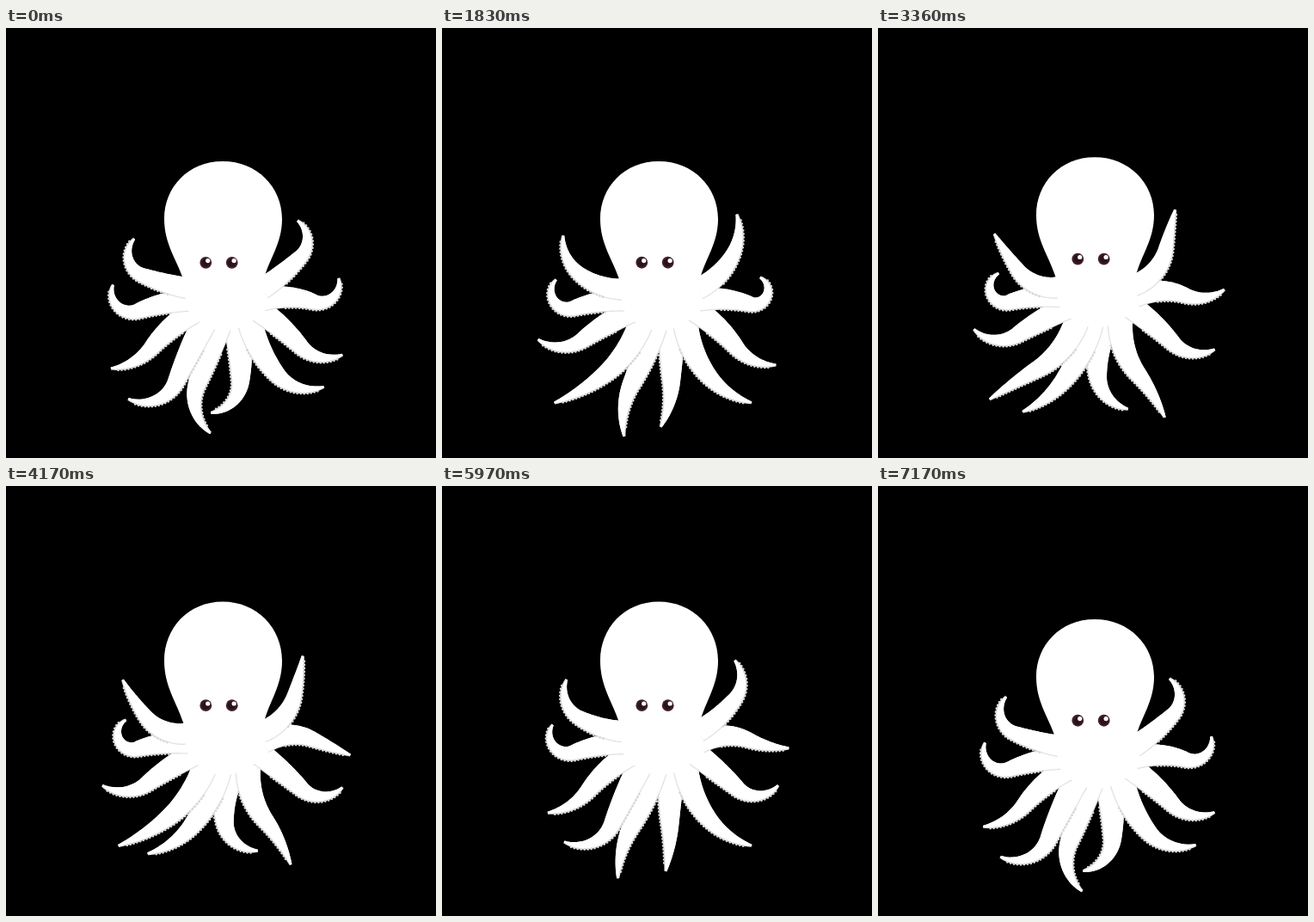
An HTML page with a canvas that plays this animation: 500 px wide and 500 px high, repeating every 7.2 s.

```html
<!DOCTYPE html>
<html lang="en">
<head>
<meta charset="utf-8">
<title>Octopus</title>
<style>
html, body { margin: 0; height: 100%; overflow: hidden; background: #000; }
canvas { display: block; }
</style>
</head>
<body>
<canvas id="stage" width="500" height="500"></canvas>
<script>
const ctx = document.getElementById('stage').getContext('2d');
const LOOP = 7200, BOB = 1800, RAD = Math.PI / 180, STEPS = 40;
const BLINKS = [2580, 5250];
const HEAD = new Path2D('M252 155C292 155 321 185 321 222C321 251 306 268 300 292' +
  'C297 308 306 322 297 332C284 344 270 352 254 352C238 352 226 344 214 332' +
  'C206 322 211 308 206 292C198 268 184 251 184 222C184 185 212 155 252 155Z');

// aim: headings of the upper, middle and end part, in degrees below the outward horizontal.
// swing: how far each heading sways once per loop, peaking at the angle lag.
// Each side runs from the innermost arm outwards.
const RIGHT = [
  { reach: 124, aim: [95, 88, 88], swing: [-12, 5, 66], lag: 20 },
  { reach: 134, aim: [75, 50, 32], swing: [-7, -1, -33], lag: 15 },
  { reach: 118, aim: [39, 46, -8], swing: [0, 5, 21], lag: 80 },
  { reach: 108, aim: [-6, 20, -38], swing: [8, -4, -75], lag: 65 },
  { reach: 106, aim: [-39, -62, -96], swing: [1, 16, -20], lag: -5 },
];
const LEFT = [
  { reach: 140, aim: [70, 61, 74], swing: [0, 10, 50], lag: 20 },
  { reach: 148, aim: [62, 49, 16], swing: [2, 20, -18], lag: -30 },
  { reach: 124, aim: [32, 42, -2], swing: [5, 10, 24], lag: -35 },
  { reach: 118, aim: [6, 18, -91], swing: [3, 2, 16], lag: 0 },
  { reach: 113, aim: [-10, -38, -80], swing: [-3, 16, -22], lag: 0 },
];

const bob = t => -12.5 * (1 - Math.cos(t / BOB * 2 * Math.PI));

// Heading at the part u of an arm, bending evenly from one aim to the next.
function heading([upper, middle, end], u) {
  return u < 0.54
    ? upper + (middle - upper) * (u - 0.18) / 0.36
    : middle + (end - middle) * (u - 0.54) / 0.32;
}

// Centre line as points with their direction; the roots sit on an ellipse.
function centreLine({ reach, aim, swing, lag }, index, side, t) {
  const sway = Math.cos(t / LOOP * 2 * Math.PI - lag * RAD);
  const aims = aim.map((a, i) => a + swing[i] * sway);
  const at = (14 + 23 * index) * RAD;
  let x = 258 + side * 41 * Math.sin(at), y = 312 + 31 * Math.cos(at);
  const line = [];
  for (let i = 0; i <= STEPS; i++) {
    const a = heading(aims, i / STEPS) * RAD;
    const dx = side * Math.cos(a), dy = Math.sin(a);
    line.push({ x, y, dx, dy, u: i / STEPS });
    x += dx * reach / STEPS;
    y += dy * reach / STEPS;
  }
  return line;
}

function trace(points) {
  ctx.beginPath();
  points.forEach(p => ctx.lineTo(p[0], p[1]));
}

function fillShape(points, color) {
  trace(points);
  ctx.fillStyle = color;
  ctx.fill();
}

function drawArm(arm, index, side, t) {
  const line = centreLine(arm, index, side, t);
  const width = 14 - index * 0.7;
  const edge = (sign, extra) => line.map(({ x, y, dx, dy, u }) => {
    const half = sign * Math.max(0, width * (1 - u ** 1.8) + 1 + extra);
    return [x - dy * half, y + dx * half];
  });
  const under = edge(side, 1), back = edge(-side, 0).reverse();
  fillShape([...under, ...back], '#e2e2e2');
  fillShape([...edge(side, -0.3), ...back], '#fff');

  // suckers
  trace(under.slice(STEPS / 4, -2));
  ctx.setLineDash([0, 4]);
  ctx.lineCap = 'round';
  ctx.lineWidth = 2.8;
  ctx.strokeStyle = '#d8d8d8';
  ctx.stroke();
}

// The head stretches a little as it rises.
function drawHead(shift) {
  ctx.save();
  ctx.translate(0, 273);
  ctx.scale(1, 1 - shift * 0.16 / 118);
  ctx.translate(0, -273);
  ctx.fillStyle = '#fff';
  ctx.fill(HEAD);
  ctx.restore();
}

function disc(x, y, r, color) {
  ctx.beginPath();
  ctx.arc(x, y, r, 0, 7);
  ctx.fillStyle = color;
  ctx.fill();
}

function drawEyes(t) {
  const shut = BLINKS.some(b => Math.abs(t - b) < 80);
  for (const x of [232.3, 262.7]) {
    if (shut) {
      disc(x, 272.8, 7.3, '#d0d1d1');
    } else {
      disc(x, 272.8, 6.9, '#41202a');
      disc(x, 272.8, 4.8, '#2a121a');
      disc(x + 2.4, 270.6, 2.6, '#fff');
    }
  }
}

function draw(t) {
  const shift = bob(t);
  ctx.fillStyle = '#000';
  ctx.fillRect(0, 0, 500, 500);
  ctx.save();
  ctx.translate(0, shift);
  RIGHT.forEach((arm, i) => drawArm(arm, i, 1, t));
  LEFT.forEach((arm, i) => drawArm(arm, i, -1, t));
  drawHead(shift);
  drawEyes(t);
  ctx.restore();
}

const start = performance.now();
function tick() {
  draw((performance.now() - start) % LOOP);
  requestAnimationFrame(tick);
}
tick();
</script>
</body>
</html>
```
